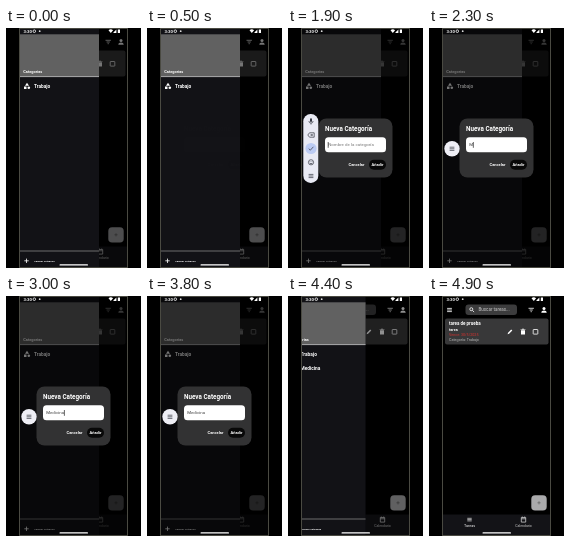
Animation of 135 by 240 pixels, one loop 5 s. Source, as an HTML page:

```html
<!DOCTYPE html>
<html lang="es">
<head>
<meta charset="utf-8">
<title>Nueva categoría</title>
<style>
  html, body { margin: 0; width: 100%; height: 100%; overflow: hidden; background: #000; }
  svg { display: block; width: 100%; height: 100%; }
  text { font-family: Roboto, sans-serif; fill: #fff; }
  .b { font-weight: 700; }
  .mid { text-anchor: middle; }
  .line { fill: none; stroke: #fff; stroke-width: .8; }
  .ink { fill: none; stroke: #333640; stroke-width: .7; }
</style>
</head>
<body>
<svg viewBox="0 0 135 240">
  <defs>
    <clipPath id="screen"><path d="M13 0h109v240H13z"/></clipPath>
    <g id="category" fill="#fff">
      <path d="M0-3.2 2-.2H-2z"/><circle cx="1.8" cy="1.7" r="1.3"/><path d="M-3 .5h2.5V3H-3z"/>
    </g>
    <path id="menu" d="M-2.4-1.6h4.8M-2.4 0h4.8M-2.4 1.6h4.8"/>
  </defs>
  <rect width="135" height="240"/>

  <g clip-path="url(#screen)">
    <!-- Task list -->
    <use href="#menu" x="20.5" y="14" class="line"/>
    <rect x="36.5" y="8.5" width="51.5" height="10.5" rx="3" fill="#3c3c3d"/>
    <circle cx="42.3" cy="13.2" r="1.5" class="line"/>
    <path d="m43.4 14.4 1.7 1.7" class="line"/>
    <text x="49.5" y="15.1" font-size="4.5" style="fill:#ccc">Buscar tareas...</text>
    <path d="M99.5 12.3h5.4M100.6 14h3.2M101.6 15.7h1.2" class="line"/>
    <circle cx="115" cy="12.4" r="1.5" fill="#fff"/>
    <path d="M112.4 16.7v-.8q0-1.5 2.6-1.5t2.6 1.5v.8z" fill="#fff"/>
    <rect x="16" y="22.5" width="103.5" height="26" rx="2" fill="#383839"/>
    <text x="20" y="28.7" font-size="4.5" class="b">tarea de prueba</text>
    <text x="20" y="34.5" font-size="3.8" class="b">tarea</text>
    <text x="20" y="39.8" font-size="3.7" style="fill:#d8322f">Vence: 30/5/2025</text>
    <text x="20" y="45.2" font-size="3.7" style="fill:#b8b8b8">Categoría: Trabajo</text>
    <path d="m78.6 38.2.4-1.5 3.2-3.2 1.1 1.1-3.2 3.2z" fill="#fff"/>
    <path d="M92 34.2h4v4.3h-4zM91.5 33.2h5v.6h-5zM93 32.7h2v.5h-2z" fill="#fff"/>
    <rect x="104.2" y="33.5" width="4.6" height="4.6" rx=".4" class="line"/>
    <rect x="102.3" y="199.3" width="15.4" height="15.2" rx="3.8" fill="#a9a9ab"/>
    <path d="M108.4 206.8h3.2M110 205.2v3.2" stroke="#555" stroke-width=".6"/>
    <rect x="13" y="218.5" width="109" height="21.500" fill="#131317"/>
    <path d="M38.300 222.300h4.400M38.300 223.600h4.400M38.300 224.900h4.400" class="line" style="stroke:#ccc"/>
    <text x="40.500" y="230.600" font-size="3.700" class="mid">Tareas</text>
    <path d="M92.300 221.500h4.400v4.600h-4.400zM92.300 222.800h4.400M93.300 220.500v1M95.700 220.500v1" class="line" style="stroke:#ccc"/>
    <text x="94.500" y="230.800" font-size="3.500" class="mid" style="fill:#ccc">Calendario</text>

    <rect id="scrim" x="13" width="109" height="240"/>

    <g id="drawer">
      <rect x="13" width="80" height="240" fill="#121216"/>
      <rect x="13" y="6.300" width="80" height="42.200" fill="#616161"/>
      <path d="M13 48.600h80" stroke="#ddd" stroke-width=".7"/>
      <text x="17.300" y="45" font-size="3.900" class="b">Categorias</text>
      <use href="#category" x="21" y="58"/>
      <text x="28" y="59.900" font-size="4.800" class="b">Trabajo</text>
      <g id="added">
        <use href="#category" x="21" y="72.500"/>
        <text x="28" y="74.400" font-size="4.800" class="b">Medicina</text>
      </g>
      <path d="M13 223h80" stroke="#aaa" stroke-width=".6"/>
      <path d="M18.300 232.800h4.400M20.500 230.600v4.400" class="line"/>
      <text x="28" y="233.700" font-size="2.500" class="b">Agregar Categoría</text>
    </g>

    <rect id="barrier" x="13" width="109" height="240"/>

    <g id="dialog">
      <rect x="30.500" y="90.500" width="74" height="59" rx="8" fill="#323233"/>
      <text x="37" y="103.300" font-size="6.300" class="b">Nueva Categoría</text>
      <rect x="37" y="109.200" width="61" height="15" rx="3.500" fill="#fff"/>
      <text id="field" x="40.200" y="118.400" font-size="4.400"></text>
      <path id="caret" d="M0 114v5.800" stroke="#222" stroke-width=".7"/>
      <text x="68.500" y="138.300" font-size="4" class="b mid">Cancelar</text>
      <rect x="81" y="131.700" width="17" height="10" rx="5" fill="#080808"/>
      <text x="89.500" y="138.300" font-size="4" class="b mid">Añadir</text>
    </g>

    <!-- Floating keyboard tools -->
    <g id="tools">
      <rect x="15.300" y="86" width="15" height="69" rx="7.300" fill="#e9eaf4"/>
      <rect x="22" y="90.300" width="2" height="3.600" rx="1" fill="#333640"/>
      <path d="M20.900 93q0 2.100 2.100 2.100t2.100-2.100M23 95.200v1.300M19.800 107l1.700-2.200h4.700v4.400h-4.700zM22.700 106l2 2m0-2-2 2" class="ink"/>
      <circle cx="23" cy="120.500" r="5.600" fill="#bccbf3"/>
      <path d="m20.700 120.600 1.600 1.600 3.100-3.400" class="ink"/>
      <circle cx="23" cy="134.300" r="2.600" class="ink"/>
      <path d="M21.600 135q1.400 1.500 2.800 0M22 133.200v.6M24 133.200v.6" class="ink"/>
      <use href="#menu" x="23" y="148" class="ink"/>
    </g>
    <g id="bubble">
      <circle cx="23" cy="120.800" r="7.700" fill="#eeeef5"/>
      <use href="#menu" x="23" y="120.800" class="ink"/>
    </g>

    <!-- System bars -->
    <text x="17.500" y="4.800" font-size="4.200" class="b">3:30</text>
    <circle cx="28.300" cy="3.200" r="1.300" class="line"/>
    <circle cx="33.700" cy="3.200" r=".9" fill="#ddd"/>
    <path d="M102.500 2.200q2.300-1.700 4.600 0l-2.300 2.800zM107.400 5V4.600l3-3.200V5zM111.800 1.500h2.200V5h-2.200z" fill="#fff"/>
    <rect x="53.500" y="236.300" width="28.500" height="1.200" rx=".6" fill="#fff"/>
  </g>
  <rect x="13.500" y=".5" width="108" height="239" fill="none" stroke="#4a4a42"/>
</svg>
<script>
  const LOOP = 5000;
  const el = Object.fromEntries([...document.querySelectorAll('[id]')].map(e => [e.id, e]));

  const DRAWER_WIDTH = 80;
  const tracks = {
    slide: [[4320, 0], [4400, 15], [4500, 60], [4600, DRAWER_WIDTH]],
    dialog: [[500, 0], [800, 1], [3950, 1], [4200, 0]]
  };
  const typing = [[2300, 'M'], [2400, 'Me'], [2500, 'Med'], [2600, 'Medi'],
                  [2700, 'Medic'], [2800, 'Medici'], [3000, 'Medicina']];

  function sample(track, t) {
    const next = track.findIndex(([time]) => time > t);
    if (next === 0) return track[0][1];
    if (next < 0) return track[track.length - 1][1];
    const [t0, a] = track[next - 1], [t1, b] = track[next];
    return a + (b - a) * (t - t0) / (t1 - t0);
  }

  const show = (node, on) => node.setAttribute('opacity', Number(on));
  const during = (t, from, to) => t >= from && t < to;

  function render(t) {
    const fade = sample(tracks.dialog, t);
    const slide = sample(tracks.slide, t);
    el.drawer.setAttribute('transform', `translate(${-slide} 0)`);
    show(el.scrim, .54 * (1 - slide / DRAWER_WIDTH));
    show(el.barrier, fade * .54);
    show(el.dialog, fade);
    show(el.added, t >= 4000);

    const typed = typing.reduce((word, [time, text]) => t >= time ? text : word, '');
    el.field.textContent = typed || 'Nombre de la categoría';
    el.field.style.fill = typed ? '#444' : '#777';
    const caretX = 40.2 + (typed ? el.field.getComputedTextLength() + .3 : 0);
    el.caret.setAttribute('transform', `translate(${caretX} 0)`);
    show(el.caret, during(t, 1500, 3500));

    show(el.tools, during(t, 1900, 2200));
    show(el.bubble, during(t, 2200, 4100));
  }

  const start = performance.now();
  function tick() {
    render((performance.now() - start) % LOOP);
    requestAnimationFrame(tick);
  }
  tick();
</script>
</body>
</html>
```
